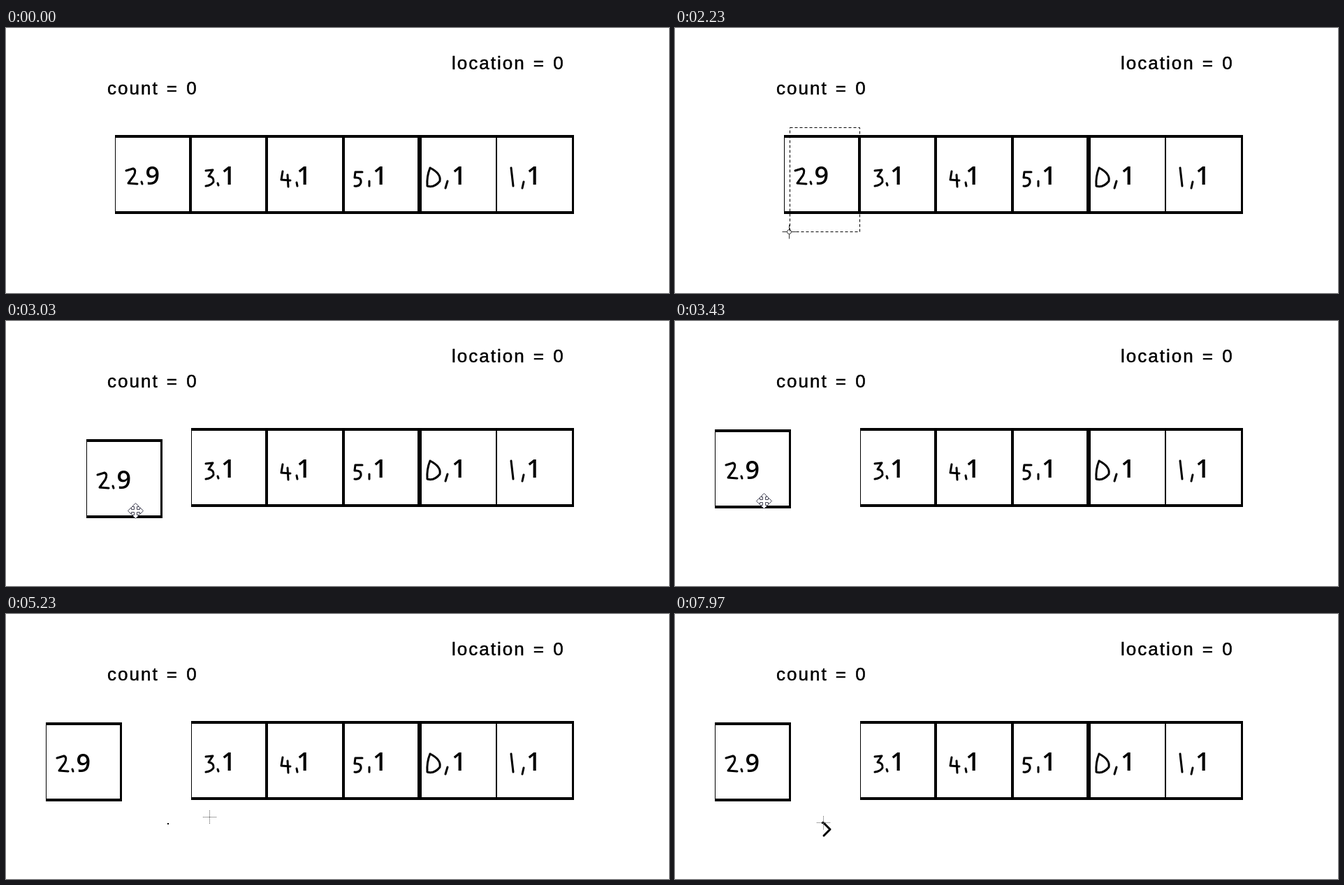
Recreate the animation shown at these times as an HTML page with a canvas. Size 949x379 px, loop 8000 ms.

```html
<!DOCTYPE html>
<html lang="en">
<head>
<meta charset="utf-8">
<title>Array sketch</title>
<style>
html, body { margin: 0; width: 100%; height: 100%; overflow: hidden; background: #fff; }
canvas { display: block; }
</style>
</head>
<body>
<canvas id="stage" width="949" height="379"></canvas>
<script>
const ctx = document.getElementById('stage').getContext('2d');
const LOOP = 8000;
const GRAB = 2860, DROP = 3430, BRUSH = 4630;
const TOP = 153, RAIL = 4, HEIGHT = 113;

// Handwritten part of each cell, then the typed digit and its x
const cells = [
  ['M172 204L182 201Q187 203 183 211L175 222L188 223M194 220L195 223', '9', 199.5],
  ['M286 204L296 203L290 212Q298 213 297 220Q294 225 286 226M303 222L304 225', '1', 308],
  ['M396 205L394 217L407 218M403 210L404 227M416 221L417 226', '1', 416],
  ['M510 206L500 206L499 214Q509 213 508 221Q506 227 499 226M520 219L520 226', '1', 525],
  ['M607 200Q602 212 603 226Q613 229 621 219Q623 208 607 200M632 219L629 229', '1', 638],
  ['M723 200L726 226M741 220L739 229', '1', 745]
].map(([path, digit, x]) => ({ ink: new Path2D(path), digit, x }));

// Pointer gestures: start, end, points passed at even intervals
const home = [264, 142], corner = [144, 289], grip = [226, 255];
const strokeStart = [212, 298], strokeEnd = [213, 317], far = [441, 240];
const gestures = [
  [730, 1530, [286, 6], [246, 160], home],
  [1830, 2230, home, [163, 291]],
  [2230, 2630, [163, 291], corner],
  [2670, GRAB, corner, grip],
  [3600, 4030, [127, 257], [276, 316], [250, 48]],
  [BRUSH, 4980, [180, 5], [114, 150], [232, 300]],
  [4980, 5230, [232, 300], [291, 290]],
  [5230, 5430, [291, 290], [325, 270]],
  [5470, 6190, [325, 270], [260, 247], [162, 280], strokeStart],
  [6190, 6420, strokeStart, [222, 308], strokeEnd],
  [6420, 7100, strokeEnd, [148, 290], [300, 219], far],
  [7130, 7830, far, [330, 225], [166, 280], strokeStart]
];
const chevron = gestures[9];

const clamp = v => Math.min(1, Math.max(0, v));

// Points already passed in a gesture, ending at the current position
function trace([from, to, ...points], t) {
  const k = clamp((t - from) / (to - from)) * (points.length - 1);
  const i = Math.min(Math.floor(k), points.length - 2);
  const [a, b] = [points[i], points[i + 1]];
  const now = a.map((v, n) => Math.round(v + (b[n] - v) * (k - i)));
  return [...points.slice(0, i + 1), now];
}

// The lifted cell swings left along a shallow arc, slowing down
function shift(t) {
  const k = 1 - (1 - clamp((t - GRAB) / (DROP - GRAB))) ** 1.5;
  return [Math.round(-99 * k), Math.round(2 * k + 15.7 * Math.sin(Math.PI * k))];
}

function pointerAt(t) {
  if (t >= GRAB && t < 3600) return shift(t).map((v, n) => v + grip[n]);
  const current = gestures.filter(g => g[0] <= t).pop() || gestures[0];
  return trace(current, t).pop();
}

function drawCell({ ink, digit, x }) {
  ctx.lineWidth = 3;
  ctx.stroke(ink);
  ctx.font = '600 36px "Open Sans", "Noto Sans", sans-serif';
  ctx.fillText(digit, x, 224);
}

function rails(x, w) {
  ctx.fillRect(x, TOP, w, RAIL);
  ctx.fillRect(x, TOP + HEIGHT - RAIL, w, RAIL);
}

function wall(x, w) {
  ctx.fillRect(x, TOP, w, HEIGHT);
}

function label(text, x, y) {
  ctx.fillText(text, x, y);
  ctx.strokeText(text, x, y);
}

function drawLabels() {
  ctx.font = '26px "Liberation Sans", Arial, sans-serif';
  ctx.letterSpacing = '2px';
  ctx.wordSpacing = '2px';
  ctx.lineWidth = 0.5;
  label('count = 0', 145, 95);
  label('location = 0', 638, 59);
  ctx.letterSpacing = ctx.wordSpacing = '0px';
}

function drawArray(t) {
  rails(265, 547);
  wall(265, 1);
  [4, 4, 6, 2, 3].forEach((w, i) => wall(Math.round(373 + 109.5 * i - w / 2), w));
  cells.slice(1).forEach(drawCell);

  ctx.save();
  ctx.translate(...shift(t));
  rails(156, 109);
  wall(156, 1);
  wall(262, 3);
  drawCell(cells[0]);
  ctx.restore();
}

function drawSelection(t, pointer) {
  const dragging = t >= 1830 && t < 2630;
  const held = t >= 2630 && t < GRAB;
  const dropped = t >= 3600 && t < 3760;
  if (!dragging && !held && !dropped) return;
  const [x, y] = dragging ? pointer : corner;
  ctx.save();
  ctx.translate(...shift(t));
  ctx.lineWidth = 1;
  ctx.setLineDash([4, 3]);
  ctx.strokeRect(x + 1.5, home[1] + .5, home[0] - x - 1, y - home[1]);
  ctx.restore();
}

function drawInk(t) {
  if (t >= 4980 && t < 5750) ctx.fillRect(231, 299, 2, 2);
  if (t >= chevron[0]) {
    ctx.lineWidth = 3;
    ctx.beginPath();
    trace(chevron, t).forEach(p => ctx.lineTo(...p));
    ctx.stroke();
  }
  if (t >= 7970) ctx.fillRect(210, 298, 2, 2);
}

function selectCursor() {
  ctx.strokeStyle = '#333';
  ctx.beginPath();
  ctx.arc(.5, .5, 3, 0, Math.PI * 2);
  for (const s of [-1, 1]) {
    ctx.moveTo(.5 + s * 3, .5);
    ctx.lineTo(.5 + s * 10, .5);
    ctx.moveTo(.5, .5 + s * 3);
    ctx.lineTo(.5, .5 + s * 10);
  }
  ctx.stroke();
}

function moveCursor() {
  const arm = [[-2, -2], [-2, -6], [-5, -6], [0, -11], [5, -6], [2, -6]];
  ctx.beginPath();
  for (let i = 0; i < 4; i++) {
    for (let [x, y] of arm) {
      for (let n = 0; n < i; n++) [x, y] = [-y, x];
      ctx.lineTo(x + .5, y + .5);
    }
  }
  ctx.closePath();
  ctx.fillStyle = '#fff';
  ctx.strokeStyle = '#445';
  ctx.fill();
  ctx.stroke();
}

function brushCursor() {
  ctx.fillStyle = '#555';
  for (let d = -9; d <= 9; d += 2) {
    ctx.fillRect(d, 0, 1, 1);
    ctx.fillRect(0, d, 1, 1);
  }
}

function drawPointer(t, pos) {
  if (t < 730 || (t >= 4030 && t < BRUSH)) return;
  ctx.save();
  ctx.translate(...pos);
  ctx.lineWidth = 1;
  if (t >= BRUSH) brushCursor();
  else if (t >= 2700 && t < 3660) moveCursor();
  else selectCursor();
  ctx.restore();
}

function draw(t) {
  ctx.fillStyle = '#fff';
  ctx.fillRect(0, 0, 949, 379);
  ctx.fillStyle = ctx.strokeStyle = '#000';
  ctx.lineCap = ctx.lineJoin = 'round';
  const pos = pointerAt(t);
  drawLabels();
  drawArray(t);
  drawInk(t);
  ctx.lineCap = 'butt';
  ctx.lineJoin = 'miter';
  drawSelection(t, pos);
  drawPointer(t, pos);
}

const start = performance.now();
function tick() {
  draw((performance.now() - start) % LOOP);
  requestAnimationFrame(tick);
}
tick();
</script>
</body>
</html>
```
